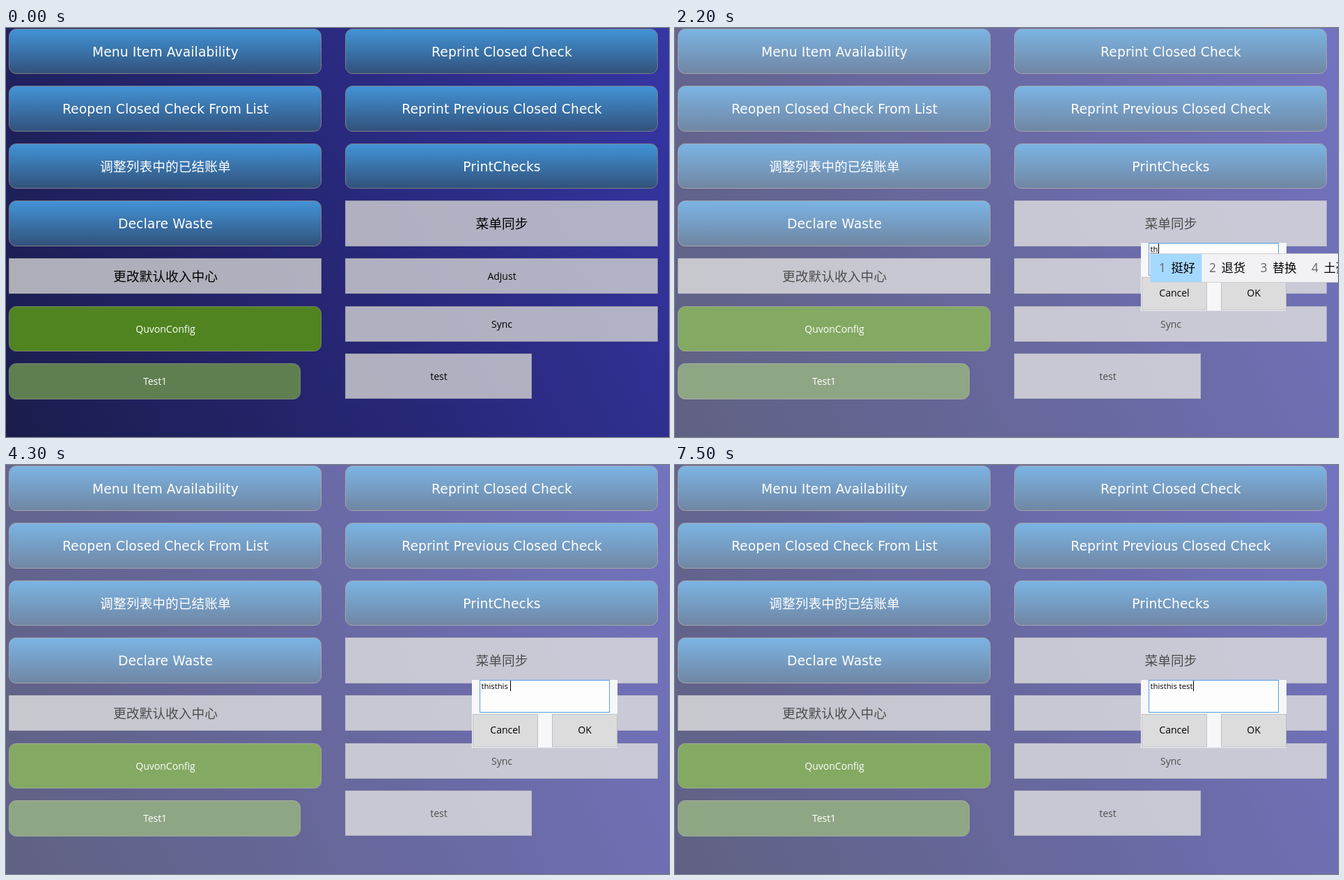
An HTML page for the animation above (8 s loop, 952 px wide and 588 px high).

```html
<!DOCTYPE html>
<html lang="zh-CN">
<head>
<meta charset="utf-8">
<style>
html, body { margin: 0; width: 100%; height: 100%; overflow: hidden; }
#stage {
  position: relative; width: 952px; height: 588px; overflow: hidden;
  background: linear-gradient(65deg, #1a1d4c, #28287a 52%, #3636a5);
}
svg { position: absolute; left: 0; top: 0; }
text { font: 14px "Open Sans", "Noto Sans CJK SC", "Noto Sans CJK", sans-serif; white-space: pre; }
.mid { text-anchor: middle; }
.big { font: 18.67px "DejaVu Sans", "Noto Sans CJK SC", "Noto Sans CJK", sans-serif; letter-spacing: .12px; }
#dialog { display: none; }
#typed { font-size: 11.3px; }
#ime text { font-size: 17.3px; }
</style>
</head>
<body>
<div id="stage">
  <svg width="952" height="588">
    <defs>
      <linearGradient id="blue" x2="0" y2="1">
        <stop stop-color="#4294d8"/><stop offset="1" stop-color="#32517a"/>
      </linearGradient>
    </defs>
    <g id="menu"></g>
    <g id="dialog">
      <rect width="952" height="588" fill="#fff" fill-opacity=".3"/>
      <rect x="669" y="309" width="209" height="97.5" fill="#f7f7f9"/>
      <rect id="field" x="680.5" y="309.5" width="186" height="46" fill="#fdfdfd"/>
      <g fill="#dcdcdc" stroke="#c0c0c4">
        <rect x="670.5" y="358.5" width="93" height="46.5"/>
        <rect x="784.5" y="358.5" width="93" height="46.5"/>
      </g>
      <text class="mid" x="717" y="386">Cancel</text>
      <text class="mid" x="831" y="386">OK</text>
      <text id="typed" x="682.5" y="322"></text>
      <path id="underline" stroke="#333" stroke-dasharray="1 1"/>
      <rect id="caret" y="310" width="1" height="15"/>
      <g id="ime"></g>
    </g>
  </svg>
</div>
<script>
const $ = id => document.getElementById(id);

const styles = {
  blue: { fill: 'url(#blue)', stroke: '#7f7f88', r: 10, ink: '#fff' },
  gray: { fill: 'rgba(211,211,211,.8)', stroke: '#9c9caa', r: 0, ink: '#000' },
  green: { fill: '#4f8420', stroke: '#77846a', r: 10, ink: '#fff' },
  olive: { fill: '#5f7f50', stroke: '#7b8878', r: 10, ink: '#fff' }
};

function button(label, style, x, y, w, h, big) {
  const s = styles[style];
  return `<rect x="${x + .5}" y="${y + .5}" width="${w - 1}" height="${h - 1}" rx="${s.r}" fill="${s.fill}" stroke="${s.stroke}"/>
    <text class="mid ${big ? 'big' : ''}" x="${x + w / 2 + .5}" y="${y + h / 2 + (big ? 7 : 5.3)}" fill="${s.ink}">${label}</text>`;
}

const L = 4, R = 487, W = 449;
$('menu').innerHTML = [
  ['Menu Item Availability', 'blue', L, 1, W, 65, 1],
  ['Reopen Closed Check From List', 'blue', L, 83, W, 66, 1],
  ['调整列表中的已结账单', 'blue', L, 166, W, 65, 1],
  ['Declare Waste', 'blue', L, 248, W, 66, 1],
  ['更改默认收入中心', 'gray', L, 331, W, 51, 1],
  ['QuvonConfig', 'green', L, 400, W, 65],
  ['Test1', 'olive', L, 482, 419, 52],
  ['Reprint Closed Check', 'blue', R, 1, W, 65, 1],
  ['Reprint Previous Closed Check', 'blue', R, 83, W, 66, 1],
  ['PrintChecks', 'blue', R, 166, W, 65, 1],
  ['菜单同步', 'gray', R, 248, W, 66, 1],
  ['Adjust', 'gray', R, 331, W, 51],
  ['Sync', 'gray', R, 400, W, 51],
  ['test', 'gray', R, 468, 268, 65]
].map(b => button(...b)).join('');

// Start time, typed text, caret x (0 = hidden), input candidates
const steps = [
  [500, '', 0],
  [600, '', 683], [1000, '', 0], [1500, '', 683], [2000, '', 0],
  [2100, 't', 687, '他 她 它 图'],
  [2200, 'th', 694, '挺好 退货 替换 土豪'],
  [2300, 'thi', 697, '挺好 退货 替换 土豪'],
  [2400, 'this', 702, 'this 挺好 退货 替换'],
  [2900, 'thisthis', 721],
  [3000, 'thisthis ', 724],
  [3200, 'thisthis t', 728],
  [3400, 'thisthis te', 735], [3900, 'thisthis te', 0],
  [4100, 'thisthis t', 728],
  [4300, 'thisthis ', 724], [4800, 'thisthis ', 0],
  [5200, 'thisthis ', 724], [5700, 'thisthis ', 0],
  [6300, 'thisthis ', 724], [6700, 'thisthis ', 0],
  [7100, 'thisthis t', 728],
  [7200, 'thisthis te', 735],
  [7400, 'thisthis tes', 740],
  [7500, 'thisthis test', 744]
];

function candidates(list) {
  let x = 683;
  const cells = list.split(' ').map((word, i) => {
    const w = word === 'this' ? 70 : 38.5 + 17.5 * word.length;
    const cell = `${i ? '' : `<rect x="683" y="325" width="${w}" height="40" fill="#a5d8ff"/>`}
      <text x="${x + (i ? 10.5 : 12)}" y="351" fill="#666">${i + 1}</text>
      <text x="${x + (i ? 28 : 29.5)}" y="351">${word}</text>`;
    x += w;
    return cell;
  });
  return '<rect x="682.5" y="324.5" width="280" height="41" fill="#f2f2f4" stroke="#d0d0d4"/>' + cells.join('');
}

function show([start, text, x, list]) {
  $('field').setAttribute('stroke', start > 500 ? '#569de5' : '#abadb3');
  $('typed').textContent = text;
  $('caret').setAttribute('x', x || -9);
  $('underline').setAttribute('d', list ? `M683 323.5H${x}` : '');
  $('ime').innerHTML = list ? candidates(list) : '';
}

let shown;
function draw() {
  const t = performance.now() % 8000;
  const step = steps.findLast(s => s[0] <= t);
  if (step !== shown) {
    shown = step;
    $('dialog').style.display = step ? 'inline' : 'none';
    if (step) show(step);
  }
  requestAnimationFrame(draw);
}
draw();
</script>
</body>
</html>
```
